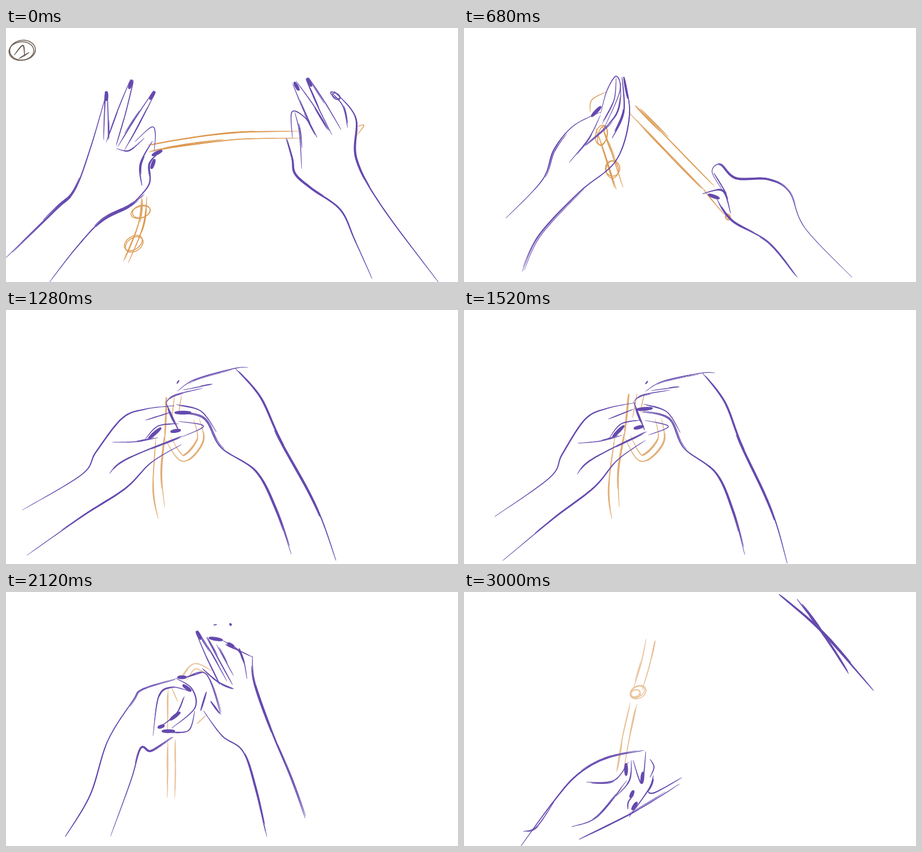
Animation of 778 by 438 pixels, one loop 3.24 s. Source, as an HTML page with a canvas:

```html
<!DOCTYPE html>
<html lang="en">
<head>
<meta charset="utf-8">
<title>Tying a knot</title>
<style>
html, body { margin: 0; width: 100%; height: 100%; overflow: hidden; background: #fff; }
canvas { display: block; width: 778px; height: 438px; }
</style>
</head>
<body>
<canvas width="778" height="438"></canvas>
<script>
const ctx = document.querySelector('canvas').getContext('2d');
const INK = '#654aae', LOOP = 3240, TICK = 40;

let seed = 1;
const rand = () => (seed = seed * 16807 % 2147483647) / 2147483647;
const around = r => (rand() * 2 - 1) * r;

const spline = (a, b, c, d, t) =>
  b + t * (c - a + t * (2 * a - 5 * b + 4 * c - d + t * (3 * (b - c) + d - a))) / 2;

// Samples a smooth curve through x, y, x, y, ...
function curve(p) {
  const n = p.length / 2, pts = [], at = (i, k) => p[2 * Math.max(0, Math.min(n - 1, i)) + k];
  for (let j = 0; j <= (n - 1) * 12; j++) {
    const i = Math.min(n - 2, Math.floor(j / 12)), t = j / 12 - i;
    pts.push([0, 1].map(k => spline(at(i - 1, k), at(i, k), at(i + 1, k), at(i + 2, k), t)));
  }
  return pts;
}

// Moves each point sideways by size(j).
const offset = (pts, size) => pts.map(([x, y], j) => {
  const a = pts[Math.max(0, j - 1)], b = pts[Math.min(pts.length - 1, j + 1)];
  const dx = b[0] - a[0], dy = b[1] - a[1], r = size(j) / (Math.hypot(dx, dy) || 1);
  return [x - dy * r, y + dx * r];
});

// Fills one tapered pen mark.
function mark(w, pts) {
  const half = j => w / 2 * (.3 + .7 * Math.sin(Math.PI * j / (pts.length - 1)) ** .7);
  ctx.beginPath();
  for (const q of [...offset(pts, half), ...offset(pts, j => -half(j)).reverse()]) ctx.lineTo(...q);
  ctx.fill();
}

// A drawn line, gone over again in loose pieces when it is long.
function sketch(w, pts) {
  const n = pts.length, [a, b] = [pts[0], pts[n - 1]];
  mark(w, pts);
  const again = Math.min(3, Math.floor(Math.hypot(b[0] - a[0], b[1] - a[1]) / 50));
  for (let k = 0; k < again; k++) {
    const from = Math.floor(rand() * n * .6), piece = pts.slice(from, from + Math.ceil(n * .4));
    const d = around(2), drift = around(2) / n;
    mark(w * (.6 + rand() * .6), offset(piece, j => d + drift * j));
  }
}

const line = (w, ...p) => sketch(w, curve(p));
const nail = (...p) => mark(6.5, curve(p));

function rope(gap, ...p) {
  for (const side of [-.5, .5]) sketch(1.9, offset(curve(p), () => gap * side));
}

function knot(x, y, rx, ry, tilt = 0) {
  for (let k = 0; k < 2; k++) {
    ctx.lineWidth = 1.5;
    ctx.beginPath();
    ctx.ellipse(x + around(1.5), y + around(1.5), rx + around(1.5), ry + around(1.5), tilt, 0, 7);
    ctx.stroke();
  }
}

// Two sides spreading from a nailed tip to a base of the given width.
function finger(x, y, bx, by, width) {
  const len = Math.hypot(bx - x, by - y), ux = (bx - x) / len, uy = (by - y) / len;
  nail(x, y, x + ux * 17, y + uy * 17);
  for (const s of [-.5, .5]) {
    const nx = -uy * width * s, ny = ux * width * s;
    line(1.7, x + nx * .3, y + ny * .3, (x + bx) / 2 + nx * .8, (y + by) / 2 + ny * .8, bx + nx, by + ny);
  }
}

// "at" holds two anchors per part: grip and far end.
const poses = [
  {
    color: '#dc9a52',
    at: { left: [200, 195, 60, 380], right: [545, 190, 670, 400], cord: [248, 207, 505, 188] },
    left() {
      line(2.2, 173,112, 146,205, 118,280, 85,313, 0,396);
      line(2.2, 238,287, 210,308, 165,332, 120,380, 75,438);
      finger(173, 109, 172, 193, 8);
      finger(217, 89, 181, 200, 18);
      finger(256, 109, 198, 208, 13);
      line(1.6, 190,208, 212,211, 238,190);
      line(1.6, 222,196, 250,171, 257,182, 255,212);
      line(2.4, 252,195, 231,235, 234,272);
      line(2.4, 262,216, 247,235, 246,270, 215,306);
      nail(269,211, 251,220);
      nail(256,226, 250,243);
    },
    right() {
      line(2.5, 565,109, 602,155, 603,225, 645,305, 744,438);
      line(2.5, 482,190, 492,225, 497,252, 525,277, 575,313, 600,365, 630,432);
      finger(496, 93, 546, 183, 24);
      finger(518, 86, 569, 180, 18);
      line(1.8, 559,110, 580,135, 588,172);
      line(1.8, 493,190, 492,145, 515,155, 535,188);
      line(1.6, 497,145, 505,180, 509,243);
      knot(568, 117, 8, 5, .6);
    },
    cord() {
      rope(12, 245,208, 300,198, 400,186, 507,184);
      rope(9, 238,290, 232,340, 206,404);
      knot(233, 317, 16, 11, -.3);
      knot(220, 372, 18, 10, -.6);
      line(1.5, 604,170, 616,168, 604,185);
    }
  },
  {
    color: '#dc9c56',
    at: { left: [245, 170, 100, 360], right: [450, 280, 610, 400], cord: [288, 140, 437, 278] },
    left() {
      line(1.8, 72,328, 135,262, 155,210, 188,169, 235,145);
      line(1.8, 275,84, 285,150, 262,228, 200,282, 130,357, 100,420);
      line(1.7, 235,148, 246,108, 262,83, 268,110, 240,175);
      line(1.6, 262,85, 258,125, 238,165);
      line(2.4, 272,84, 275,145, 255,190);
      line(1.6, 235,150, 215,190, 181,232);
      line(1.6, 270,95, 262,150, 205,205);
      mark(4, curve([275,84, 282,122]));
      nail(236,135, 219,153);
    },
    right() {
      line(1.8, 445,280, 427,248, 441,235, 468,259, 523,261, 560,283, 587,345, 668,430);
      line(2.2, 435,295, 462,333, 525,370, 574,430);
      line(2.2, 410,286, 445,281, 459,320);
      line(2, 430,250, 452,286);
      nail(420,287, 440,294);
    },
    cord() {
      rope(17, 289,139, 350,202, 425,279);
      line(1.5, 413,280, 448,322);
      line(1.6, 245,110, 220,124, 217,145);
      rope(12, 232,170, 248,215, 268,277);
      knot(237, 185, 9, 18, .2);
      knot(256, 243, 11, 14);
      knot(454, 326, 5, 4);
    }
  },
  {
    color: '#e2ae76',
    at: { left: [270, 200, 60, 370], right: [310, 170, 520, 380], cord: [285, 170, 265, 345] },
    left() {
      line(2, 28,345, 130,284, 155,245, 200,187, 240,171, 290,165);
      line(2, 36,423, 130,357, 205,308, 250,263, 302,232);
      line(1.7, 178,282, 205,258, 300,218);
      line(1.6, 183,228, 225,227, 262,220);
      line(1.8, 240,190, 285,176);
      line(1.8, 240,222, 262,200, 297,196);
      line(1.8, 250,240, 305,217);
      nail(267,203, 245,222);
      nail(283,210, 301,207);
      nail(290,177, 319,177);
    },
    right() {
      line(2.6, 395,101, 437,150, 470,220, 520,310, 545,365, 568,432);
      line(2.2, 290,177, 340,187, 370,237, 430,278, 465,345, 491,421);
      line(1.8, 275,160, 290,147, 338,135);
      line(1.5, 295,140, 325,120, 392,101, 417,99);
      line(1.4, 305,138, 355,128);
      line(1.8, 293,163, 335,174, 362,210);
      line(2.5, 275,160, 298,210);
      line(1.6, 297,192, 340,200, 305,218);
      line(2.5, 294,127, 298,121);
    },
    cord() {
      line(2, 277,150, 275,200, 268,280, 273,340);
      line(2, 258,220, 253,310, 262,360);
      line(1.6, 290,148, 285,190);
      line(1.6, 302,147, 297,180);
      rope(10, 328,188, 334,225, 305,256, 279,222);
    }
  },
  {
    color: '#e8bd92',
    at: { left: [290, 190, 120, 390], right: [345, 170, 505, 390], cord: [300, 160, 250, 345] },
    left() {
      line(2, 54,422, 165,292, 215,210, 240,167, 310,142);
      line(2.3, 150,427, 185,360, 235,295, 275,275, 300,255);
      line(2.4, 240,190, 270,165, 305,145);
      line(1.7, 230,266, 270,235, 283,185, 305,150);
      line(1.8, 282,232, 318,205, 328,160);
      line(1.7, 300,205, 322,182, 326,163);
      line(1.7, 238,293, 282,255, 308,235);
      nail(291,145, 310,143);
      nail(309,184, 303,203);
      nail(306,235, 292,257);
      nail(323,222, 317,247);
    },
    right() {
      line(2, 410,134, 452,152, 470,200, 487,252, 557,437);
      line(2.2, 352,175, 365,230, 425,278, 455,335, 468,425);
      line(1.8, 322,140, 355,119, 410,134);
      line(3.5, 333,155, 358,172);
      line(2, 333,155, 330,190);
      line(1.8, 355,172, 371,222);
      line(1.6, 345,168, 340,195);
      nail(321,142, 333,130);
    },
    cord() {
      rope(13, 300,160, 330,137, 379,149);
      rope(11, 292,172, 281,235, 264,315, 248,352);
      rope(10, 312,196, 335,209, 358,193);
      line(2, 285,178, 302,200);
    }
  },
  {
    color: '#e8be94',
    at: { left: [285, 200, 145, 390], right: [365, 160, 475, 370], cord: [300, 150, 285, 355] },
    left() {
      line(1.8, 102,422, 145,350, 175,257, 218,188, 235,167, 298,148);
      line(2, 180,421, 215,325, 232,270, 250,275, 288,250);
      line(1.8, 253,248, 263,180, 285,164, 318,172);
      line(2, 293,149, 320,167, 325,200, 285,235);
      line(2, 262,235, 293,210, 307,180);
      line(1.8, 285,243, 315,238, 325,205);
      line(2, 300,150, 340,138);
      nail(304,160, 319,171);
      nail(300,207, 282,221);
      nail(273,230, 261,234);
      nail(268,240, 291,240);
      nail(295,147, 311,147);
    },
    right() {
      line(2.3, 424,110, 428,155, 455,235, 490,320, 515,390);
      line(2.2, 340,205, 372,248, 408,275, 430,340, 449,422);
      finger(328, 67, 374, 157, 14);
      line(2, 345,78, 390,160);
      line(1.8, 372,83, 404,105, 415,150);
      line(1.5, 362,90, 392,145);
      line(1.8, 378,90, 424,112);
      line(2.4, 338,132, 365,155, 392,167);
      line(1.8, 310,147, 345,142, 370,212);
      line(3, 345,172, 335,205);
      line(3, 352,188, 368,210);
      nail(349,79, 373,83);
      nail(381,88, 393,95);
      line(3.5, 401,97, 410,122);
      line(2, 357,57, 363,56);
      line(4, 385,54, 388,58);
    },
    cord() {
      rope(9, 307,150, 325,128, 352,140);
      rope(13, 285,254, 285,305, 284,355);
      line(2, 279,165, 278,245);
      line(1.8, 285,165, 296,190);
      line(2, 345,212, 328,228);
    }
  },
  {
    color: '#e6bb8c',
    at: { left: [250, 210, 125, 380], right: [330, 130, 515, 330], cord: [265, 160, 290, 355] },
    left() {
      line(2.1, 78,417, 150,305, 200,205, 255,167);
      line(1.8, 90,411, 152,312);
      line(2.1, 149,428, 175,370, 212,325, 238,308, 275,257);
      line(1.7, 180,247, 222,232, 236,195);
      line(1.7, 255,167, 286,205, 262,248);
      line(1.7, 242,205, 244,238, 210,260);
      line(1.8, 220,255, 206,305);
      line(1.7, 258,215, 258,245);
      line(1.8, 285,215, 295,226, 288,237);
      line(2.8, 282,240, 328,222);
      line(1.6, 270,256, 330,225);
      nail(236,194, 236,215);
      nail(264,180, 265,213);
      nail(267,230, 257,250);
    },
    right() {
      line(2.5, 411,56, 465,100, 520,190, 545,270, 557,365);
      line(1.4, 530,205, 561,320);
      line(2, 430,160, 456,215, 470,295, 475,362);
      line(1.2, 453,220, 483,345, 480,405);
      line(1.8, 311,140, 313,90, 335,69, 415,66);
      line(1.6, 335,65, 350,56, 392,56);
      line(2, 302,157, 325,135, 350,133);
      line(1.8, 330,95, 340,118, 325,128);
      line(2, 327,137, 330,175);
      line(2.2, 330,135, 350,151, 430,160);
      line(3, 334,97, 330,126);
      nail(322,143, 303,157);
      line(4, 335,145, 352,159);
    },
    cord() {
      rope(10, 258,180, 265,145, 312,117);
      rope(9, 266,188, 300,184, 330,160);
      line(1.8, 265,185, 280,147, 315,138);
      line(1.8, 245,140, 230,170, 255,198, 280,195);
      line(1.8, 255,138, 241,160, 247,185);
      rope(10, 248,198, 264,265, 290,357);
    },
    arrow() {
      line(1.8, 53,259, 133,260);
      line(1.8, 118,254, 137,261, 122,277);
    }
  },
  {
    color: '#e8bf96',
    at: { left: [290, 330, 120, 425], right: [490, -70, 680, 140], cord: [296, 175, 262, 310] },
    left() {
      line(2.3, 98,438, 155,360, 195,315, 245,287, 310,273);
      line(1.8, 102,413, 125,405, 155,362);
      line(1.7, 198,426, 300,375, 371,331);
      line(1.8, 210,328, 258,325, 283,293);
      line(1.7, 288,290, 285,325, 262,352);
      line(2, 313,275, 306,330, 291,290);
      line(1.8, 320,288, 327,302, 320,320);
      line(2, 326,316, 318,340, 284,388);
      line(2, 315,343, 328,346, 375,320);
      line(1.8, 185,405, 230,387, 280,325);
      line(2.2, 282,375, 283,362, 292,350);
      nail(279,295, 279,317);
      nail(308,310, 306,331);
      nail(292,342, 286,355);
      nail(298,362, 289,376);
    },
    right() {
      line(3.2, 542,4, 615,68, 705,170);
      line(2.6, 573,12, 615,68, 662,141);
    },
    cord() {
      rope(15, 321,82, 312,125, 299,168);
      rope(12, 292,192, 279,250, 268,312);
      knot(299, 173, 14, 10, -.5);
      knot(296, 176, 9, 6, -.4);
    }
  }
];

function label() {
  knot(28, 39, 22, 16, -.1);
  line(2.2, 14,47, 29,30, 32,49);
  line(2.2, 22,53, 40,42);
}

// Each move takes "count" even steps between two positions along the poses.
const moves = [
  { start: 40, end: 360, count: 4, from: 0, to: .45 },
  { start: 520, end: 680, count: 4, from: .45, to: 1 },
  { start: 800, end: 1000, count: 4, from: 1, to: 1.85 },
  { start: 1280, end: 1280, count: 1, from: 1.85, to: 2 },
  { start: 1360, end: 1720, count: 7, from: 2, to: 3 },
  { start: 1960, end: 2120, count: 5, from: 3, to: 4 },
  { start: 2160, end: 2440, count: 4, from: 4, to: 5 },
  { start: 2800, end: 3000, count: 3, from: 5, to: 6 }
];

function positionAt(ms) {
  const t = Math.floor(ms / TICK) * TICK, move = moves.findLast(m => m.start <= t);
  if (!move) return 0;
  const { start, end, count, from, to } = move;
  const gap = (end - start) / (count - 1) || 1;
  const done = Math.min(count, 1 + Math.floor((t - start) / gap + 1e-6));
  return done === count ? to : from + (to - from) * done / count;
}

// Rotates, scales and shifts so that anchors "from" land on "to".
function fit(from, to) {
  const [x, y, u, v] = from, dx = u - x, dy = v - y, ex = to[2] - to[0], ey = to[3] - to[1];
  const q = dx * dx + dy * dy, c = (dx * ex + dy * ey) / q, s = (dx * ey - dy * ex) / q;
  ctx.setTransform(c, s, -s, c, to[0] - c * x + s * y, to[1] - s * x - c * y);
}

function draw(pos) {
  const i = Math.floor(pos), near = Math.round(pos), pose = poses[near];
  const a = poses[i].at, b = poses[Math.min(i + 1, poses.length - 1)].at;
  seed = 97 + near * 31;
  ctx.setTransform(1, 0, 0, 1, 0, 0);
  ctx.clearRect(0, 0, 778, 438);
  if (pos === 0) {
    ctx.fillStyle = ctx.strokeStyle = '#6b5c50';
    label();
  }
  for (const part of ['cord', 'left', 'right']) {
    ctx.fillStyle = ctx.strokeStyle = part === 'cord' ? pose.color : INK;
    fit(pose.at[part], a[part].map((v, k) => v + (b[part][k] - v) * (pos - i)));
    pose[part]();
    if (part === 'cord' && pos === near) pose.arrow?.();
  }
}

const begun = performance.now();
let shown = -1;
function frame(now) {
  const pos = positionAt(Math.max(0, now - begun) % LOOP);
  if (pos !== shown) draw(shown = pos);
  requestAnimationFrame(frame);
}
frame(begun);
</script>
</body>
</html>
```
